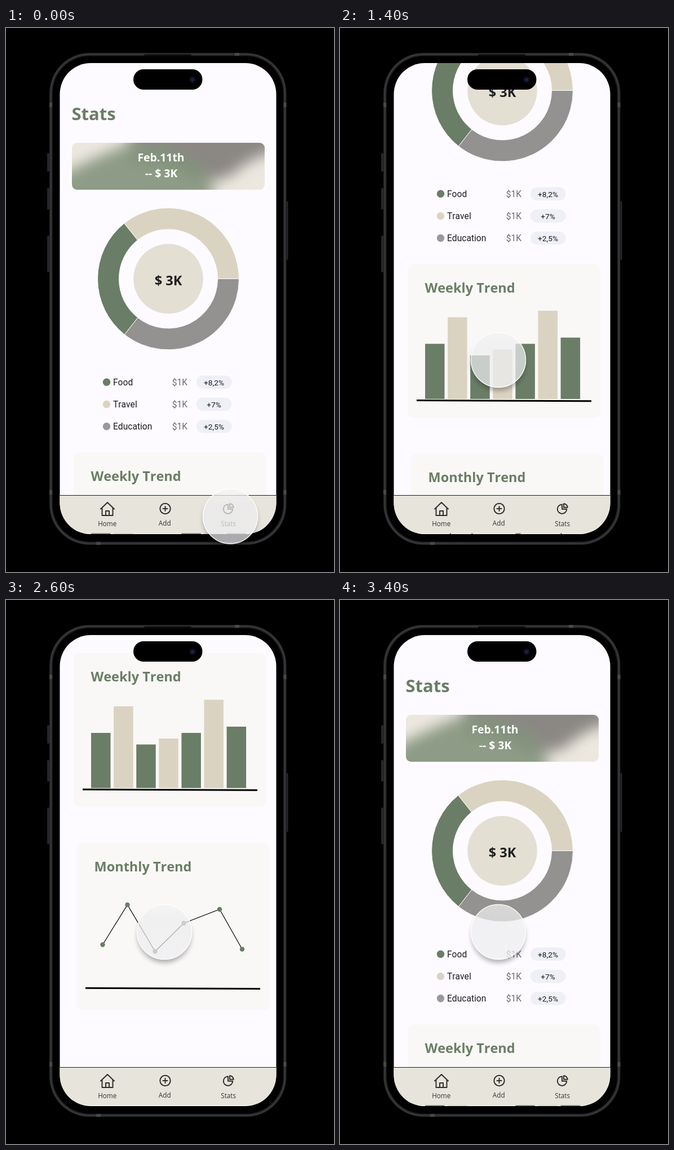
Write an HTML page that moves like this. It is 582x962 px and loops after 3.5 s.

```html
<!DOCTYPE html>
<html lang="en">
<head>
<meta charset="utf-8">
<title>Stats screen</title>
<style>
  html, body { margin: 0; width: 100%; height: 100%; overflow: hidden; background: #000; }
  svg { display: block; width: 582px; height: 962px; }
  text { font-family: "Open Sans", "Noto Sans", sans-serif; font-kerning: none; }
  .title { font-weight: 700; fill: #6a7d66; font-size: 23.5px; }
  .hero { font-weight: 700; fill: #fff; font-size: 19.4px; text-anchor: middle; }
  .tab { font-size: 11.7px; fill: #34332f; text-anchor: middle; }
  .row text { font-family: Roboto, sans-serif; font-size: 15.6px; }
  .row .pill { font-size: 13.7px; text-anchor: middle; }
  .icon { fill: none; stroke: #2f2e2b; stroke-width: 2; stroke-linejoin: round; stroke-linecap: round; }
  .axis { stroke: #000; stroke-width: 3; }
</style>
</head>
<body>
<svg viewBox="0 0 582 962">
  <defs>
    <clipPath id="screen"><rect x="95.5" y="62" width="384" height="833" rx="55"/></clipPath>
    <clipPath id="card"><rect x="117" y="203" width="342" height="83" rx="9"/></clipPath>
    <filter id="soft" x="-50%" y="-50%" width="200%" height="200%"><feGaussianBlur stdDeviation="12"/></filter>
    <filter id="shade" x="-50%" y="-50%" width="200%" height="200%"><feGaussianBlur stdDeviation="5"/></filter>
    <linearGradient id="glass" x2="0" y2="1">
      <stop offset="0" stop-color="#f2f2f3"/>
      <stop offset=".3" stop-color="#ededef"/>
      <stop offset="1" stop-color="#ededf0"/>
    </linearGradient>
    <mask id="outside">
      <rect x="-80" y="-80" width="160" height="160" fill="#fff"/>
      <circle r="49"/>
    </mask>
  </defs>

  <g fill="#26262b">
    <rect x="73" y="221" width="4" height="33" rx="1.500"/>
    <rect x="73" y="283" width="4" height="38" rx="1.500"/>
    <rect x="73" y="367" width="4" height="65" rx="1.500"/>
    <rect x="497.500" y="306" width="3" height="104" rx="1.500"/>
  </g>
  <rect x="77" y="44" width="420.500" height="870" rx="71" fill="#242426"/>
  <rect x="79.500" y="46.500" width="415.500" height="865" rx="68.500" fill="none" stroke="#3a3a3c" stroke-width="2"/>
  <rect x="82.500" y="49.500" width="409.500" height="859" rx="66"/>
  <path d="M77 136h5M77 821h5M492.500 136h5M492.500 821h5M410 44v5M164 909v5" stroke="#48484a" stroke-width="8"/>
  <rect x="245" y="46.500" width="84" height="3.500" rx="1.700" fill="#0c0c0d"/>

  <g clip-path="url(#screen)">
    <rect x="95" y="62" width="385" height="834" fill="#fdfbff"/>
    <g id="page">
      <text class="title" x="116.500" y="163" style="font-size:31px">Stats</text>
      <g clip-path="url(#card)">
        <rect x="117" y="203" width="342" height="83" fill="#ece8df"/>
        <g filter="url(#soft)">
          <path d="M225 165H500V212Q435 225 398 262L345 275L215 212Z" fill="#8b8783"/>
          <path d="M70 275Q155 228 225 202Q310 212 345 242Q368 265 372 320H70Z" fill="#8e9b86"/>
          <path d="M225 215Q320 215 345 250L350 275Q300 235 225 235Z" fill="#7e8f78"/>
        </g>
      </g>
      <text class="hero" x="275" y="236">Feb.11th</text>
      <text class="hero" x="275.500" y="263.500">-- $ 3K</text>
      <g id="donut" stroke="#fff"></g>
      <circle cx="288" cy="443.500" r="61.800" fill="#e4dfd3"/>
      <text class="title" x="288" y="455" text-anchor="middle" style="fill:#1d1f1f">$ 3K</text>
      <g id="legend"></g>

      <rect x="120" y="750.500" width="341.500" height="271.500" rx="9" fill="#f9f8f6"/>
      <text class="title" x="150.500" y="800.500">Weekly Trend</text>
      <g id="bars"></g>
      <path class="axis" d="M136 991.500L446 992.800"/>

      <rect x="126" y="1086" width="341.500" height="295.500" rx="9" fill="#f9f8f6"/>
      <text class="title" x="156.500" y="1136">Monthly Trend</text>
      <g id="trend"></g>
      <path class="axis" d="M141 1342.700L451 1344"/>
    </g>

    <rect x="95" y="826" width="385" height="67.500" fill="#e7e4dc"/>
    <path d="M95 826.500H480" stroke="#1c1c1a"/>
    <g class="icon">
      <path d="M168 850.500L180 839L192 850.500M170.500 849V862H189.500V849M177 862V854H183V862"/>
      <path d="M278.500 850H286.500M282.500 846V854"/>
      <circle cx="282.500" cy="850" r="9.200"/>
      <path d="M394 842.500A8.200 8.200 0 1 0 402.200 850.700H394Z"/>
      <path d="M397 841.200V847.800H403.800A7 7 0 0 0 397 841.200Z"/>
    </g>
    <text class="tab" x="179.700" y="880.500">Home</text>
    <text class="tab" x="281.700" y="879.500">Add</text>
    <text class="tab" x="394.700" y="880.500">Stats</text>
  </g>

  <rect x="226" y="73" width="122.500" height="36" rx="18"/>
  <circle cx="331" cy="91.500" r="6" fill="#0b0d1c"/>
  <circle cx="331" cy="91.500" r="3" fill="#1b2047"/>

  <g id="pointer">
    <g mask="url(#outside)"><circle cy="7" r="47" fill="#000" opacity=".32" filter="url(#shade)"/></g>
    <circle r="49" fill="url(#glass)" opacity=".72"/>
    <circle r="48.500" fill="none" stroke="#fff" stroke-width="1.500" opacity=".85"/>
  </g>
</svg>
<script>
const $ = id => document.getElementById(id);
const GREEN = '#6a7d66', BEIGE = '#dbd3c1', GRAY = '#949290';
const OUTER = 125.5, INNER = 87.5;

const polar = (r, deg) => {
  const a = deg * Math.PI / 180;
  return `${288 + r * Math.cos(a)} ${443.5 - r * Math.sin(a)}`;
};
const slice = (from, to, color) =>
  `<path fill="${color}" d="M${polar(OUTER, from)}A${OUTER} ${OUTER} 0 0 0 ${polar(OUTER, to)}` +
  `L${polar(INNER, to)}A${INNER} ${INNER} 0 0 1 ${polar(INNER, from)}Z"/>`;
$('donut').innerHTML = slice(0, 128.6, BEIGE) + slice(128.6, 231.8, GREEN) + slice(231.8, 360, GRAY);

$('legend').innerHTML = [
  ['Food', '+8,2%', GREEN], ['Travel', '+7%', BEIGE], ['Education', '+2,5%', '#9899a0']
].map(([name, change, color], i) => `
  <g class="row" transform="translate(0 ${626.3 + 39.1 * i})">
    <circle cx="178.500" r="6.700" fill="${color}"/>
    <text x="190" y="5.300" fill="#1c1c1e">${name}</text>
    <text x="294.700" y="5.300" fill="#6a6a6c">$1K</text>
    <rect x="338" y="-11.800" width="62.500" height="23.600" rx="11.800" fill="#eff0f6"/>
    <text class="pill" x="369" y="5.200" fill="#15171c">${change}</text>
  </g>`).join('');

$('bars').innerHTML = [97.5, 144.5, 77, 87.5, 97.5, 156, 108.5].map((h, i) =>
  `<rect x="${151 + 40.1 * i}" y="${989 - h}" width="34.500" height="${h}" fill="${i % 2 ? BEIGE : GREEN}"/>`
).join('');

const points = [[171.5, 1266], [215.5, 1195.5], [264.5, 1278], [315.5, 1228], [379, 1203.5], [419, 1274]];
$('trend').innerHTML = `<polyline points="${points}" fill="none" stroke="#000" stroke-width="1.200"/>` +
  points.map(([x, y]) => `<circle cx="${x}" cy="${y}" r="4.200" fill="${GREEN}"/>`).join('');

// Flick down in a few momentum steps, then a decaying flick back to the top.
const BOTTOM = 656.5;
const down = [333, 440, 510, 558, 595];
function scrollAt(t) {
  if (t < 1400 || t >= 3100) return 0;
  if (t < 1900) return down[(t - 1400) / 100];
  return t < 2600 ? BOTTOM : BOTTOM * 0.49 ** ((t - 2600) / 100);
}

function draw() {
  const t = Math.floor(performance.now() % 3500 / 100) * 100; // ten steps a second
  const p = Math.min(1, Math.max(0, (t - 100) / 600));
  const e = p * p * (3 - 2 * p);
  $('pointer').setAttribute('transform', `translate(${398 - 117 * e} ${863.5 - 276.5 * e})`);
  $('page').setAttribute('transform', `translate(0 ${-scrollAt(t)})`);
  requestAnimationFrame(draw);
}
draw();
</script>
</body>
</html>
```
